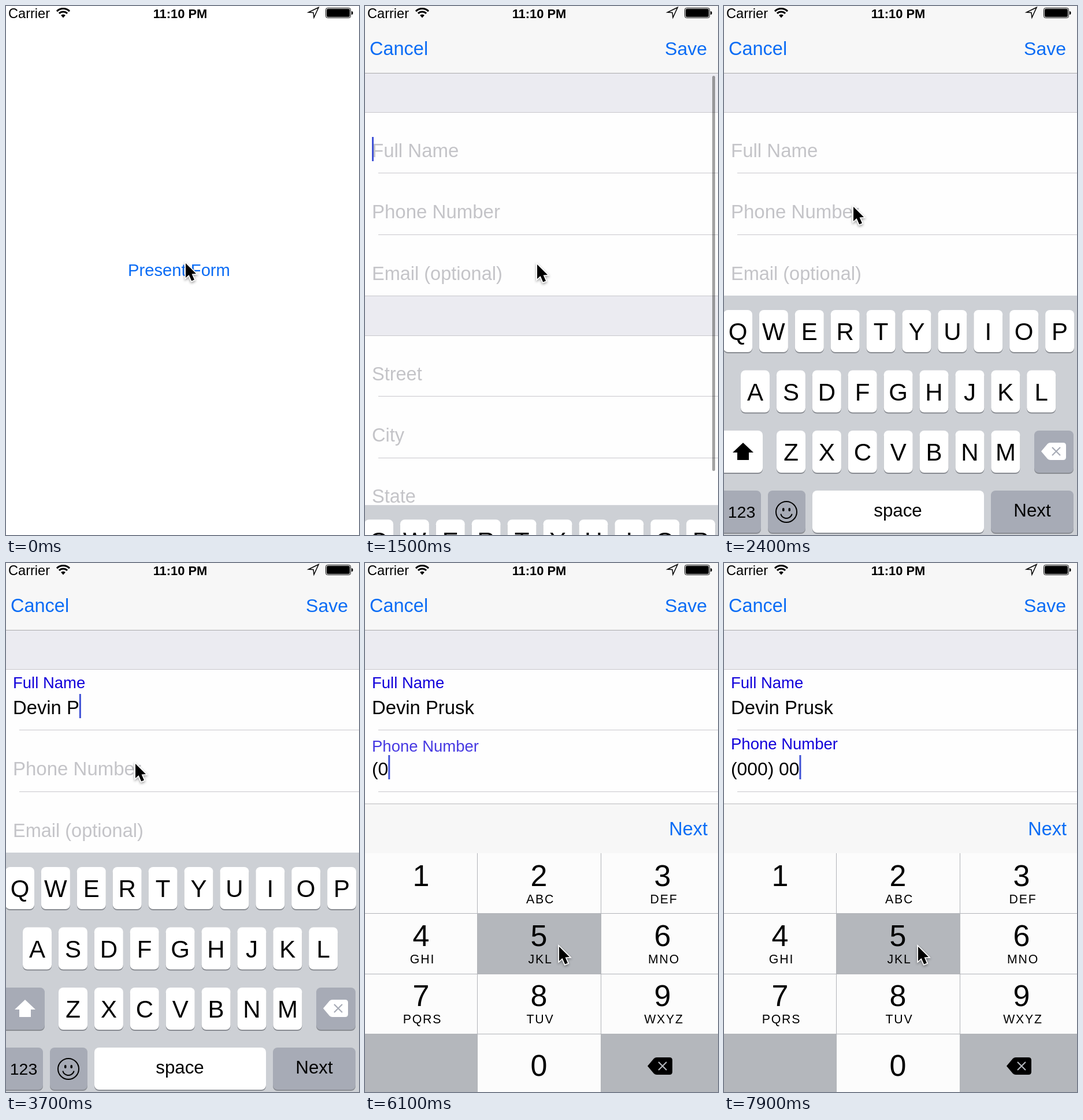
Recreate the animation shown at these times as an HTML page with a canvas. Size 611x917 px, loop 8000 ms.

```html
<!DOCTYPE html>
<html lang="en">
<head>
<meta charset="utf-8">
<style>
html, body { margin: 0; width: 100%; height: 100%; overflow: hidden; background: #fff; }
canvas { display: block; }
</style>
</head>
<body>
<canvas id="stage" width="611" height="917"></canvas>
<script>
const W = 611, H = 917, LOOP = 8000;
const c = document.getElementById('stage').getContext('2d');
const BLUE = '#0a6cf5', LABEL = '#1200da', HINT = '#c4c4c8', RULE = '#c8c7cc';
const NAME = 'Devin Prusk', NAME_START = 2800, KEY_STEP = 150;
const PHONE = ['', '(0', '(00', '(000) ', '(000) 0', '(000) 00'];
const TAP_START = 5900, TAP_STEP = 450, TAP_HOLD = 250;
const PAD_START = 5500;
const NAME_SIZE = 32.8, PHONE_SIZE = 31.8;

const clamp = v => Math.max(0, Math.min(1, v));
const easeOut = p => 1 - (1 - p) ** 3;
const easeInOut = p => p < .5 ? 2 * p * p : 1 - 2 * (1 - p) ** 2;
const progress = (t, start, length) => clamp((t - start) / length);

function rect(x, y, w, h, color) {
  c.fillStyle = color;
  c.fillRect(x, y, w, h);
}

function round(x, y, w, h, r, color) {
  c.fillStyle = color;
  c.beginPath();
  c.roundRect(x, y, w, h, r);
  c.fill();
}

function setFont(size, weight = 400) {
  c.font = `${weight} ${size}px "Liberation Sans", Arial, sans-serif`;
}

function text(s, x, y, size, color = '#000', align = 'left', weight = 400) {
  setFont(size, weight);
  c.fillStyle = color;
  c.textAlign = align;
  c.fillText(s, x, y);
}

function trace(points) {
  c.beginPath();
  points.forEach(([x, y]) => c.lineTo(x, y));
  c.closePath();
}

function shifted(x, y, draw) {
  c.save();
  c.translate(x, y);
  draw();
  c.restore();
}

function statusBar() {
  text('Carrier', 4, 21, 23.6);
  text('11:10 PM', 301.5, 20.5, 21.9, '#000', 'center', 700);
  c.strokeStyle = c.fillStyle = '#000';
  c.lineWidth = 3.2;
  for (const r of [10, 15.5]) {
    c.beginPath();
    c.arc(99, 20, r, -Math.PI * .75, -Math.PI * .25);
    c.stroke();
  }
  c.beginPath();
  c.moveTo(99, 20.5);
  c.arc(99, 20, 5.6, -Math.PI * .75, -Math.PI * .25);
  c.fill();
  c.lineWidth = 1.5;
  trace([[541, 2.5], [523.5, 11], [532, 11.5], [533, 20]]);
  c.stroke();
  c.lineWidth = 1;
  c.beginPath();
  c.roundRect(553.5, 3.5, 43, 17, 3);
  c.stroke();
  round(555, 5, 40, 14, 2, '#000');
  round(598, 9, 2.5, 6, [0, 3, 3, 0], '#000');
}

function caret(value, size, y) {
  setFont(size);
  rect(12 + c.measureText(value).width, y, 3, 42, '#4052d6');
}

function blink(t, start) {
  return (t - start) % 1000 < 500;
}

function field(label, base, value, size, t, start) {
  if (!value) return text(label, 12, base, 33, HINT);
  const p = easeInOut(progress(t, start, 300));
  c.globalAlpha = p;
  text(label, 12, base - 45 + 20 * (1 - p), 27.5, LABEL);
  c.globalAlpha = 1;
  text(value, 12, base, size);
}

function form(t) {
  rect(0, 0, W, H, '#fefefe');
  rect(0, 0, W, 117, '#f7f7f7');
  text('Cancel', 8, 85, 32.5, BLUE);
  text('Save', 592, 85, 32, BLUE, 'right');
  rect(0, 117, W, 67, '#ebebf1');
  rect(0, 116, W, 1, '#a9a9ac');
  rect(0, 502, W, 69, '#ebebf1');
  for (const y of [184, 502, 571]) rect(0, y, W, 1, RULE);
  for (const y of [289, 396, 676, 783]) rect(23, y, W - 23, 1, RULE);

  const typed = t < NAME_START ? 0 : Math.floor((t - NAME_START) / KEY_STEP) + 1;
  const name = NAME.slice(0, typed);
  const taps = t < TAP_START ? 0 : Math.min(5, Math.floor((t - TAP_START) / TAP_STEP) + 1);
  const phone = PHONE[taps];
  field('Full Name', 262, name, NAME_SIZE, t, NAME_START);
  field('Phone Number', 368, phone, PHONE_SIZE, t, TAP_START);
  ['Email (optional)', 'Street', 'City', 'State'].forEach((s, i) =>
    text(s, 12, [475, 649, 755, 861][i], 32.5, HINT));

  if (t >= PAD_START) caret(phone, PHONE_SIZE, 333);
  else if (typed ? t < 4900 || t >= 5300 : t >= 1400 && blink(t, 450))
    caret(name, NAME_SIZE, 227);

  c.globalAlpha = 1 - progress(t, 1800, 300);
  round(601, 121, 5, 685, 2.5, 'rgba(0,0,0,.36)');
  c.globalAlpha = 1;
  return typed;
}

function key(x, y, w, color = '#fff') {
  round(x, y + 2, w, 73, 8, '#888b91');
  round(x, y, w, 73, 8, color);
}

// Backspace symbol, tip at the left
function backspace(x, y, color, cross) {
  shifted(x, y, () => {
    c.fillStyle = color;
    c.beginPath();
    c.moveTo(0, 15);
    c.lineTo(11, 2);
    c.quadraticCurveTo(13, 0, 16, 0);
    c.lineTo(38, 0);
    c.quadraticCurveTo(43, 0, 43, 5);
    c.lineTo(43, 25);
    c.quadraticCurveTo(43, 30, 38, 30);
    c.lineTo(16, 30);
    c.quadraticCurveTo(13, 30, 11, 28);
    c.fill();
    c.strokeStyle = cross;
    c.lineWidth = 2.2;
    c.beginPath();
    c.moveTo(19, 8); c.lineTo(33, 22);
    c.moveTo(33, 8); c.lineTo(19, 22);
    c.stroke();
  });
}

function keyboard(shift, nextDown) {
  const dark = '#a7abb6';
  rect(0, 502, W, H - 502, '#cdd0d5');
  [['QWERTYUIOP', 24], ['ASDFGHJKL', 54], ['ZXCVBNM', 116]].forEach(([row, x0], r) => {
    const y = 527 + 104.5 * r;
    [...row].forEach((letter, i) => {
      const x = x0 + 61.9 * i;
      key(x - 25, y, 50);
      text(letter, x, y + 52, 42, '#000', 'center');
    });
  });
  key(-8, 736, 75, shift ? '#fff' : dark);
  c.fillStyle = shift ? '#000' : '#fff';
  trace([[33, 757], [51, 774], [43, 774], [43, 787], [23, 787], [23, 774], [15, 774]]);
  c.fill();
  key(537, 736, 68, dark);
  backspace(549, 757, '#fff', dark);
  key(-8, 840, 72, dark);
  text('123', 30.5, 887, 28.5, '#000', 'center');
  key(76, 840, 65, dark);
  c.strokeStyle = '#000';
  c.lineWidth = 2;
  c.beginPath();
  c.arc(108, 877, 18, 0, 7);
  c.stroke();
  c.beginPath();
  c.arc(108, 878, 10, .25, Math.PI - .25);
  c.stroke();
  round(101, 870, 3.5, 6, 2, '#000');
  round(111.5, 870, 3.5, 6, 2, '#000');
  key(153, 840, 297);
  text('space', 301, 885, 31.3, '#000', 'center');
  key(462, 840, 143, nextDown ? '#fff' : dark);
  text('Next', 533.5, 885, 31.3, '#000', 'center');
}

function keypad(pressed) {
  const line = '#b1b3b8', grey = '#b4b7bc';
  const letters = ['', 'ABC', 'DEF', 'GHI', 'JKL', 'MNO', 'PQRS', 'TUV', 'WXYZ'];
  const centers = [97, 301, 515];
  rect(0, 417, W, 86, '#f7f7f7');
  rect(0, 417, W, 1, '#bababc');
  text('Next', 593, 472, 32.5, BLUE, 'right');
  rect(0, 503, W, H - 503, '#fcfcfc');
  if (pressed) rect(195, 608, 213, 104, grey);
  rect(0, 817, 194, 100, grey);
  rect(409, 817, 202, 100, grey);
  for (const x of [194, 408]) rect(x, 503, 1, H - 503, line);
  for (const y of [607, 712, 816]) rect(0, y, W, 1, line);
  letters.forEach((s, i) => {
    const x = centers[i % 3], y = 560 + 104.2 * Math.floor(i / 3);
    text(i + 1, x, y, 52, '#000', 'center');
    c.letterSpacing = '1.8px';
    text(s, x + 2.5, y + 30, 21.3, '#000', 'center');
    c.letterSpacing = '0px';
  });
  text('0', 301, 888.5, 52, '#000', 'center');
  backspace(489, 857, '#000', grey);
}

const PATH = [[0, 311, 446], [300, 311, 446], [800, 298, 448], [1800, 298, 448],
  [2300, 224, 348], [4500, 224, 348], [5200, 529, 866], [5500, 529, 866], [5900, 336, 665]];

function pointer(t) {
  const i = PATH.findLastIndex(k => k[0] <= t);
  const a = PATH[i], b = PATH[i + 1] || a;
  const p = a === b ? 0 : easeInOut((t - a[0]) / (b[0] - a[0]));
  shifted(a[1] + (b[1] - a[1]) * p, a[2] + (b[2] - a[2]) * p, () => {
    trace([[0, 0], [0, 25], [5.6, 20], [10.2, 30.5], [15, 28.5], [10.6, 18.5], [18, 18]]);
    c.shadowColor = 'rgba(0,0,0,.4)';
    c.shadowBlur = 4;
    c.shadowOffsetY = 2;
    c.strokeStyle = '#fff';
    c.lineWidth = 3.4;
    c.stroke();
    c.shadowColor = 'transparent';
    c.fillStyle = '#000';
    c.fill();
  });
}

function draw(t) {
  rect(0, 0, W, H, '#fff');
  c.globalAlpha = t >= 800 && t < 1000 ? .25 : 1;
  text('Present Form', 299.5, 468, 29.2, BLUE, 'center');
  c.globalAlpha = 1;
  if (t >= 1000) {
    shifted(0, H * (1 - easeOut(progress(t, 1000, 400))), () => {
      const typed = form(t);
      if (t >= PAD_START) {
        keypad(t >= TAP_START && (t - TAP_START) % TAP_STEP < TAP_HOLD);
      } else {
        const rise = easeInOut(progress(t, 1400, 400));
        shifted(0, 415 * (1 - rise), () => keyboard(typed === 0 || typed === 6, t >= 5300));
      }
    });
  }
  statusBar();
  pointer(t);
}

function tick(now) {
  draw(Math.floor(now % LOOP / 100) * 100);
  requestAnimationFrame(tick);
}
requestAnimationFrame(tick);
</script>
</body>
</html>
```
